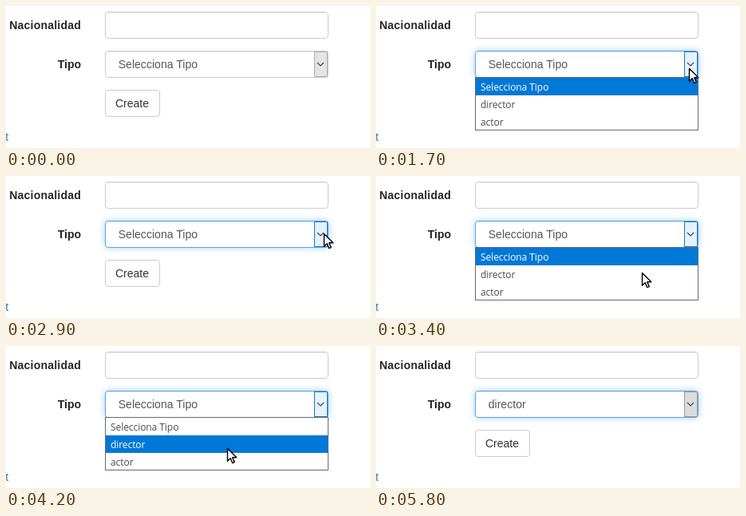
These frames come from a looping animation (456 by 178 pixels, 5900 ms). An HTML page:

```html
<!DOCTYPE html>
<html lang="es">
<head>
<meta charset="utf-8">
<title>Formulario</title>
<style>
  html, body { margin: 0; width: 100%; height: 100%; overflow: hidden; background: #fff; }
  svg { display: block; }
  text { font: 14px "Liberation Sans", Arial, sans-serif; fill: #333; }
  .label { font-weight: bold; text-anchor: end; fill: #262626; }
  .box { fill: #fff; stroke: #ccc; }
  .inset { stroke: #000; stroke-opacity: .075; }
  #value { fill: #555; letter-spacing: .04px; }
  #list text { font: 12px "Open Sans", "Noto Sans", sans-serif; fill: #4a4a4a; letter-spacing: -.06px; }
  #list .active { fill: #fff; }
  .focused #field { stroke: #5ca5de; }
  #arrow { fill: #e4e4e4; stroke: #adadad; }
  #chevron { fill: none; stroke: #444; stroke-width: 1.2; }
  .gray #arrow { fill: #dcdcdc; stroke: #999; }
  .hot #arrow { fill: #e5f1fb; stroke: #1a78c2; }
</style>
</head>
<body>
<svg id="stage" width="456" height="178" viewBox="0 0 456 178">
  <defs>
    <filter id="blur" x="-10%" y="-60%" width="120%" height="220%">
      <feGaussianBlur stdDeviation="4"/>
    </filter>
  </defs>

  <text class="label" x="94" y="29" letter-spacing=".22">Nacionalidad</text>
  <rect class="box" x="124.5" y="7.5" width="279" height="33" rx="3.5"/>
  <path class="inset" d="M127 8.5H401"/>

  <text class="label" x="94" y="78">Tipo</text>
  <rect id="glow" x="124" y="56" width="280" height="34" rx="4" fill="#66afe9" fill-opacity=".6" filter="url(#blur)"/>
  <rect id="field" class="box" x="124.5" y="56.5" width="279" height="33" rx="3.5"/>
  <path class="inset" d="M127 57.5H386"/>
  <text id="value" x="140.7" y="78"></text>
  <rect id="arrow" x="386.5" y="57.5" width="16" height="31"/>
  <path id="chevron" d="M390 71L394 75L398 71"/>

  <rect class="box" x="124.5" y="105.5" width="68" height="33" rx="3.5"/>
  <text x="137" y="127">Create</text>
  <text x="-.7" y="169" style="fill:#337ab7">t</text>

  <g id="list">
    <rect x="124.5" y="89.5" width="279" height="66" fill="#fff" stroke="#6a6a6a"/>
    <rect id="mark" x="125" width="278" height="22" fill="#0078d7"/>
  </g>

  <path id="cursor" d="M.5 .5V16.3L4.2 12.8L6.8 18.7L9.3 17.6L6.7 11.8H11.8Z" fill="#fff" stroke="#000" stroke-width="1.4" stroke-linejoin="round"/>
</svg>
<script>
const LOOP = 5900, STEP = 100;
const OPTIONS = ["Selecciona Tipo", "director", "actor"];
const ROW = 22, LIST_TOP = 90;

const ENTRY = { x: 456, y: 178 };
const MOVES = [
  { from: 100, to: 1000, x: 392, y: 78 },   // onto the arrow
  { from: 2000, to: 2200, x: 384, y: 82 },
  { from: 2400, to: 2900, x: 398, y: 72 },  // back to the arrow
  { from: 3100, to: 3600, x: 297, y: 147 }, // down to the last option
  { from: 3600, to: 3800, x: 287, y: 127 }, // up to the middle one
  { from: 3800, to: 4500, x: 271, y: 128 },
  { from: 4800, to: 5300, x: 258, y: 179 }  // out through the bottom
];

const $ = id => document.getElementById(id);
const between = (t, a, b) => t >= a && t < b;
const clamp = (v, lo, hi) => Math.max(lo, Math.min(hi, v));
const ease = u => u * u * (3 - 2 * u);

function show(node, on) {
  node.style.display = on ? "" : "none";
}

function pointerAt(t) {
  let { x, y } = ENTRY;
  for (const move of MOVES) {
    const k = ease(clamp((t - move.from) / (move.to - move.from), 0, 1));
    x += (move.x - x) * k;
    y += (move.y - y) * k;
  }
  return { x, y };
}

const rows = OPTIONS.map((name, i) => {
  const row = document.createElementNS("http://www.w3.org/2000/svg", "text");
  row.setAttribute("x", 131);
  row.setAttribute("y", LIST_TOP + 16 + i * ROW);
  row.textContent = name;
  $("list").append(row);
  return row;
});

function draw(t) {
  const focused = t >= 1500;
  const hot = between(t, 1500, 5600);
  const stage = $("stage").classList;
  stage.toggle("focused", focused);
  stage.toggle("hot", hot);
  stage.toggle("gray", t >= 1000 && !hot);
  show($("glow"), focused);
  $("value").textContent = OPTIONS[t < 4700 ? 0 : 1];

  // The highlight trails the pointer by one step.
  show($("list"), between(t, 1600, 2000) || between(t, 3100, 4500));
  const hit = Math.floor((pointerAt(t - STEP).y - LIST_TOP) / ROW);
  const active = clamp(hit, 0, OPTIONS.length - 1);
  $("mark").setAttribute("y", LIST_TOP + active * ROW);
  rows.forEach((row, i) => row.classList.toggle("active", i === active));

  const { x, y } = pointerAt(t);
  show($("cursor"), between(t, 100, 5300));
  $("cursor").setAttribute("transform", `translate(${Math.round(x)} ${Math.round(y)})`);
}

function tick() {
  const t = performance.now() % LOOP;
  draw(Math.floor(t / STEP) * STEP);
  requestAnimationFrame(tick);
}
tick();
</script>
</body>
</html>
```
